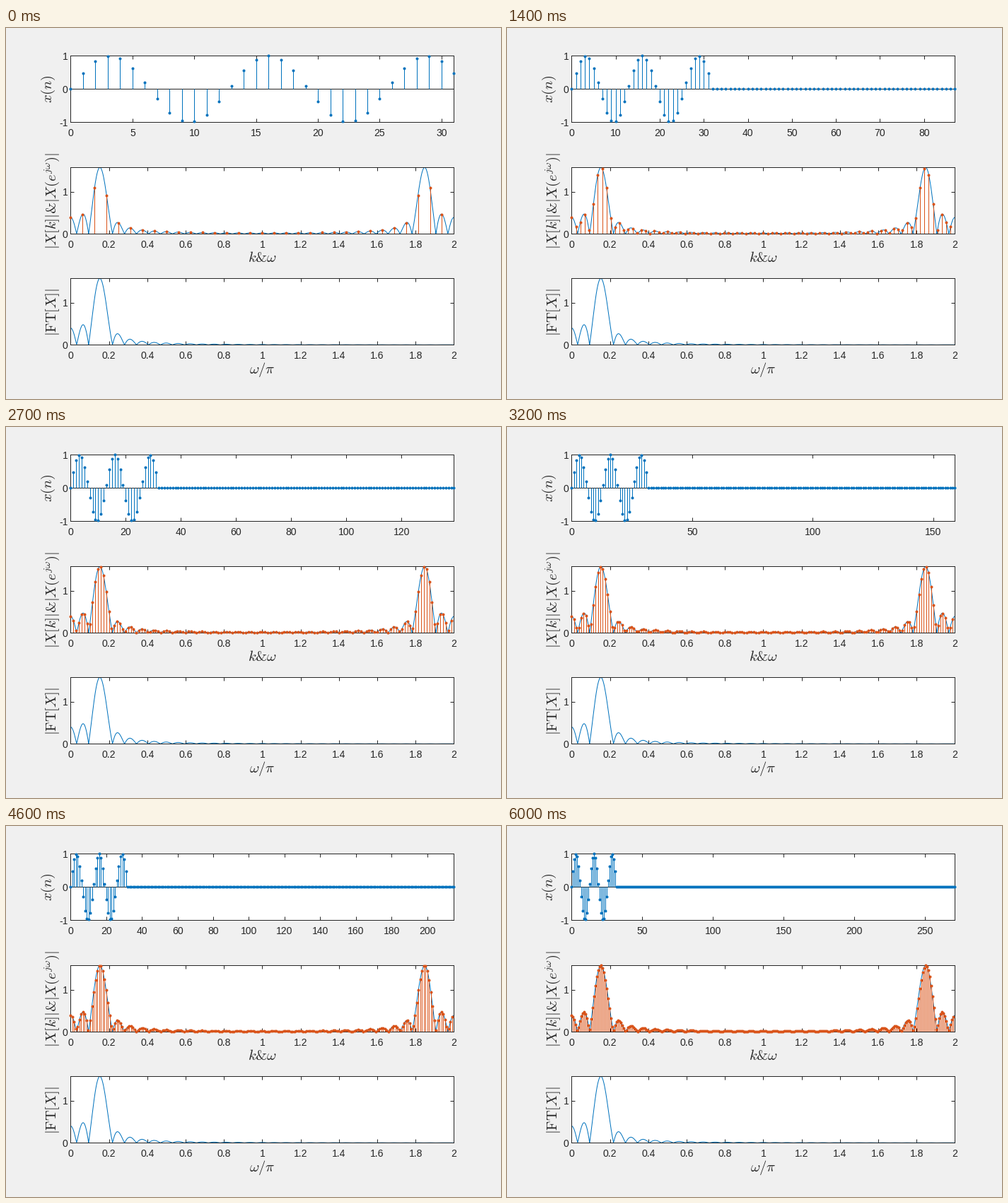
A matplotlib script that plays this animation: 700 px wide and 525 px high, repeating every 6100 ms.

```python
import numpy as np
import matplotlib.pyplot as plt
from matplotlib.animation import FuncAnimation

W, H, DPI = 700, 525, 100
PX = 72 / DPI  # points per pixel
BLUE, ORANGE, INK = "#0072BD", "#D95319", "#262626"
LENGTH, FRAMES = 32, 61
W0 = 5 * np.pi / LENGTH
SCALE = np.pi / LENGTH

plt.rcParams.update({
    "font.family": "Liberation Sans",
    "font.size": 14 * PX,
    "mathtext.fontset": "cm",
    "axes.unicode_minus": False,
    "axes.linewidth": PX,
    "axes.edgecolor": INK,
})

signal = np.sin(W0 * np.arange(LENGTH))


def dtft(omega):
    """Scaled magnitude spectrum of the sampled sine burst."""
    kernel = np.exp(-1j * np.outer(omega, np.arange(LENGTH)))
    return SCALE * np.abs(kernel @ signal)


def burst_ft(omega):
    """Scaled magnitude spectrum of the continuous sine burst."""
    gain = 2 * W0 / (W0**2 - omega**2)
    return SCALE * np.abs(gain * np.cos(LENGTH / 2 * omega))


def tick_step(last):
    """Step that reaches furthest, then gives most ticks, with at most 11."""
    steps = [s for s in (5, 10, 20, 50) if last // s <= 10]
    return max(steps, key=lambda s: (last // s * s, last // s))


fig = plt.figure(figsize=(W / DPI, H / DPI), dpi=DPI, facecolor="#F0F0F0")


def label(x, y, text, rotation=0):
    fig.text(x / W, 1 - y / H, text, size=20.5 * PX, color=INK, ha="center",
             va="baseline", rotation=rotation, rotation_mode="anchor")


def panel(top, ylim, yticks):
    # Just under half a pixel, so that edges snap to the intended pixel.
    left, bottom = 91.4, top + 94.4
    ax = fig.add_axes([left / W, 1 - bottom / H, 542 / W, 94 / H])
    ax.set_ylim(*ylim)
    ax.set_yticks(yticks, [f"{t:g}" for t in yticks])
    ax.tick_params(direction="in", top=True, right=True, length=5.4 * PX,
                   width=PX, color=INK, labelcolor=INK)
    ax.tick_params(axis="x", pad=8.4 * PX)
    ax.tick_params(axis="y", pad=4 * PX)
    return ax


def spectrum_panel(top, curve):
    ax = panel(top, (0, curve.max()), [0, 1])
    ax.set_xlim(0, 2)
    ticks = np.arange(11) / 5
    ax.set_xticks(ticks, [f"{t:g}" for t in ticks])
    ax.plot(grid, curve, color=BLUE, lw=PX)
    return ax


class Stems:
    def __init__(self, ax, color):
        self.lines = ax.vlines([], [], [], color=color, lw=PX, zorder=2.2)
        self.dots, = ax.plot([], [], "o", color=color, ms=4 * PX, mew=0,
                             zorder=4, clip_on=False)

    def set(self, x, y):
        self.lines.set_segments([[(a, 0), (a, b)] for a, b in zip(x, y)])
        self.dots.set_data(x, y)


grid = np.linspace(0, 2, 1000)
time_ax = panel(39, (-1, 1), [-1, 0, 1])
time_ax.axhline(0, color=INK, lw=PX, zorder=2.1)
freq_ax = spectrum_panel(197, dtft(np.pi * grid))
spectrum_panel(354, burst_ft(np.pi * grid))

label(65, 86, "$x(n)$", 90)
label(71, 244, r"$|X[k]|\mathrm{&}|X(e^{j\omega})|$", 90)
label(71, 402.5, r"$|\mathrm{FT}[X]|$", 90)
label(362.5, 331, r"$k\mathrm{&}\omega$")
label(362.5, 489, r"$\omega/\pi$")

time_stems = Stems(time_ax, BLUE)
freq_stems = Stems(freq_ax, ORANGE)


def update(i):
    size = LENGTH + 4 * i
    n = np.arange(size)
    time_stems.set(n, np.pad(signal, (0, size - LENGTH)))
    freq_stems.set(2 * n / size, dtft(2 * np.pi * n / size))
    ticks = np.arange(0, size, tick_step(size - 1))
    time_ax.set_xticks(ticks, [str(t) for t in ticks])
    time_ax.set_xlim(0, size - 1)


anim = FuncAnimation(fig, update, frames=FRAMES, init_func=lambda: update(0),
                     interval=100, repeat=True, repeat_delay=0)
plt.show()
```
